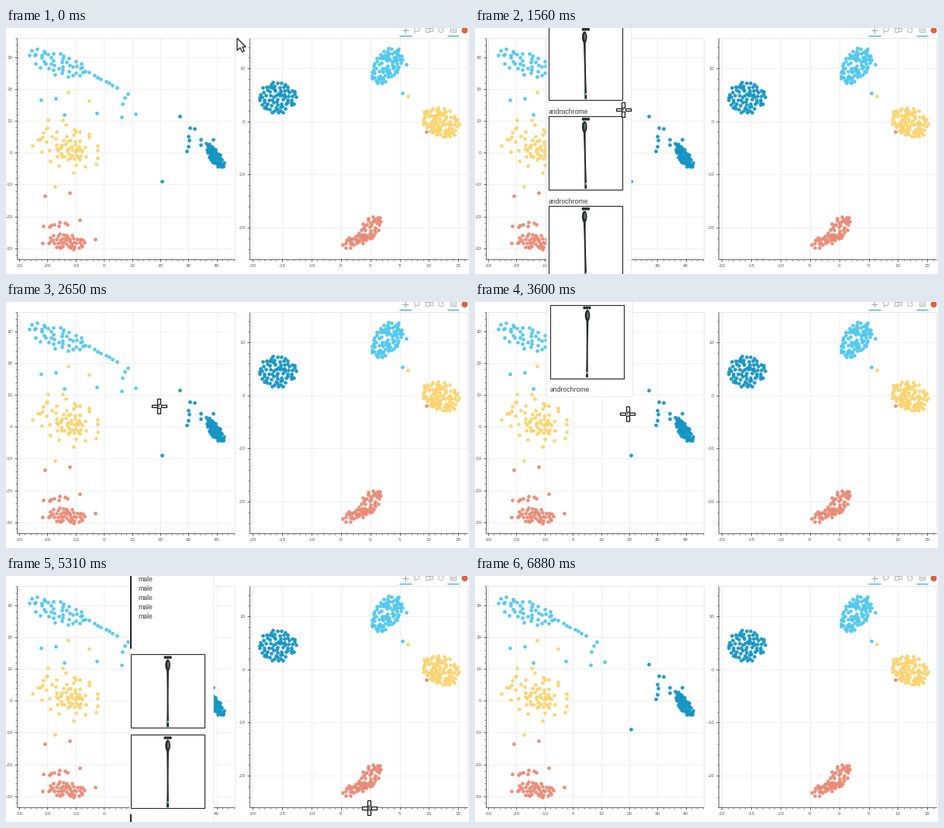
These frames come from a looping animation (597 by 318 pixels, 8000 ms). A matplotlib script:

```python
import numpy as np
import matplotlib.pyplot as plt
from matplotlib.animation import FuncAnimation
from matplotlib.collections import LineCollection
from matplotlib.patches import Arc, Circle, Ellipse, Polygon, Rectangle

W, H, DPI = 597, 318, 100
INTERVAL, LOOP = 40, 8000
PX = 72 / DPI
SKY, BLUE, YELLOW, RED = "#50c8ee", "#1495c3", "#fbd36c", "#e98a75"
INK, GREY, GRID = "#2b2b2b", "#5c5c5c", "#f0f0f0"

rng = np.random.default_rng(7)
fig = plt.figure(figsize=(W / DPI, H / DPI), dpi=DPI, facecolor="white")
ax = fig.add_axes([0, 0, 1, 1])
ax.set_xlim(0, W)
ax.set_ylim(H, 0)
ax.axis("off")


def lines(segments, color, width=1.0, z=1):
    ax.add_collection(LineCollection(segments, colors=color, linewidths=width * PX, zorder=z))


def label(x, y, text, size, color=GREY, ha="center", z=3):
    return ax.text(x, y, text, fontsize=size * PX, color=color, ha=ha,
                   va="center_baseline", family="Liberation Sans", zorder=z)


def ticks(start, step, low, high):
    pos = start + step * np.arange(-60, 61)
    return pos[(pos >= low) & (pos <= high)]


def plot_frame(left, right, x_first, x_step, x_labels, y_first, y_step, y_labels):
    top, bottom = 13, 299
    xs = x_first + x_step * np.arange(len(x_labels))
    ys = y_first + y_step * np.arange(len(y_labels))
    lines([[(x, top), (x, bottom)] for x in xs], GRID)
    lines([[(left, y), (right, y)] for y in ys], GRID)
    lines([[(left, top), (right, top), (right, bottom)]], "#e8e8e8")
    lines([[(left, top), (left, bottom), (right, bottom)]], "#5a5a5a", 0.9, 2)
    small = [[(x, bottom), (x, bottom + 2)] for x in ticks(x_first, x_step / 5, left, right)]
    small += [[(left - 2, y), (left, y)] for y in ticks(y_first, y_step / 5, top, bottom)]
    large = [[(x, bottom - 1), (x, bottom + 3)] for x in xs]
    large += [[(left - 3, y), (left + 1, y)] for y in ys]
    lines(small, GREY, 0.7, 2)
    lines(large, GREY, 0.9, 2)
    for x, value in zip(xs, x_labels):
        label(x, 307, str(value), 6.3)
    for y, value in zip(ys, y_labels):
        label(left - 5, y, str(value), 6.3, ha="right")


def blob(n, cx, cy, rx, ry, tilt=0, power=0.5):
    """Evenly spread random points in a tilted ellipse; a higher power crowds the middle."""
    disc = np.zeros((0, 2))
    for _ in range(n):
        r, a = rng.random(5) ** power, rng.uniform(0, 2 * np.pi, 5)
        tries = np.column_stack([rx * r * np.cos(a), ry * r * np.sin(a)])
        gaps = [np.hypot(*(disc - t).T).min(initial=99) for t in tries]
        disc = np.vstack([disc, tries[np.argmax(gaps)]])
    c, s = np.cos(np.radians(tilt)), np.sin(np.radians(tilt))
    return disc @ np.array([[c, s], [-s, c]]) + (cx, cy)


def trail(n, start, end, jitter):
    """Points strung along a line."""
    return np.linspace(start, end, n) + rng.uniform(-jitter, jitter, (n, 2))


def dots(color, *groups):
    x, y = np.vstack(groups).T
    ax.scatter(x, y, s=(4.7 * PX) ** 2, color=color, lw=0, alpha=0.95, zorder=4)


def left_scatter():
    dots(SKY, blob(39, 66, 46, 41, 15, 14), blob(5, 42, 31, 10, 5),
         trail(10, (98, 52), (142, 77), 2), trail(3, (157, 84), (149, 98), 2),
         [(167, 111), (149, 115), (117, 110), (45, 93), (64, 91), (75, 112)])
    dots(YELLOW, blob(35, 80, 156, 42, 31, 25, 0.6), blob(28, 81, 157, 17, 13, 20),
         trail(6, (37, 153), (57, 121), 3),
         [(80, 83), (107, 94), (73, 119), (90, 134), (107, 137), (63, 205)])
    dots(RED, blob(44, 77, 276, 25, 10, 8), trail(8, (50, 258), (78, 252), 2.5),
         [(50, 217), (82, 213), (95, 248), (47, 278), (115, 273)])
    dots(BLUE, blob(52, 270, 167, 16, 7, 52), trail(6, (253, 149), (267, 153), 2.5),
         trail(4, (236, 139), (234, 159), 1),
         [(224, 114), (237, 129), (243, 130), (251, 144), (267, 144), (201, 198)])


def right_scatter():
    dots(BLUE, blob(76, 350, 89, 24, 21))
    dots(SKY, blob(84, 491, 48, 27, 16, -55), [(516, 47), (511, 84)])
    dots(YELLOW, blob(84, 560, 121, 26, 18, 28), [(518, 88)])
    dots(RED, blob(40, 469, 259, 19, 11, -50), blob(28, 450, 275, 18, 7, -22), [(542, 134)])


def toolbar():
    tone = "#b0b0b0"
    lines([[(511, 2.5), (519, 2.5)], [(515, -1), (515, 6.5)]], "#a8a0a0", 1.0, 3)
    lines([[(x, 10), (x + 15.5, 10)] for x in (507, 568.5)], "#45abc6", 1.3, 3)
    lines([[(527, 4), (528, 7)], [(562, -1), (564, 1), (561, 2)]], tone, 0.9, 3)
    lines([[(574, y), (579, y)] for y in (1, 3)], tone, 0.9, 3)
    style = dict(fill=False, ec=tone, lw=0.9 * PX, zorder=3)
    ax.add_patch(Ellipse((530, 2), 7, 5, **style))
    ax.add_patch(Rectangle((541, 0), 5, 5, **style))
    ax.add_patch(Rectangle((546, 0), 4, 4, **style))
    ax.add_patch(Arc((561, 2.5), 6.5, 6.5, theta1=0, theta2=290, **style))
    ax.add_patch(Rectangle((573, -1), 7, 6, **style))
    ax.add_patch(Circle((591.5, 3), 4, fc="#e0603f", lw=0, zorder=3))


plot_frame(13.5, 294.5, 17, 36.4, range(-30, 41, 10), 38, 41.1, range(30, -31, -10))
plot_frame(313.5, 594.5, 318, 37.9, range(-20, 16, 5), 52, 68.7, range(10, -21, -10))
lines([[(0, 317.5), (W, 317.5)]], "#bdbdbd")
left_scatter()
right_scatter()
toolbar()

overlay = []


def add(patch, z):
    patch.set_zorder(z)
    overlay.append(ax.add_patch(patch))


def caption(x, y, text):
    overlay.append(label(x, y, text, 8.7, "#3a3a3a", "left", 8))


def panel(x, y, w, h):
    add(Rectangle((x, y), w, h, fc="white", ec="#e8e8e8", lw=0.8 * PX, alpha=0.97), 6)


def insect(cx, top, lean):
    body = "#262c2e"
    for dx in (-3.2, 0, 3.2):
        add(Ellipse((cx + dx, top + 4), 4, 4, fc=body, lw=0), 8)
    add(Ellipse((cx - lean, top + 14), 6.6, 15, fc=body, lw=0), 8)
    add(Ellipse((cx - lean + 0.5, top + 13.5), 2.2, 9, fc="#6b7574", lw=0), 9)
    u = np.linspace(0, 1, 12)
    x, y = cx - lean * (1 - u), top + 19 + 75 * u
    half = 1.0 + 0.5 * (2 * u - 1) ** 2
    outline = np.column_stack([np.r_[x - half, (x + half)[::-1]], np.r_[y, y[::-1]]])
    add(Polygon(outline, fc=body, lw=0), 8)
    add(Rectangle((cx - 1, top + 86), 2.4, 3.2, fc="#6fa9ba", lw=0), 9)


def picture(x, y, lean=0, text=None):
    add(Rectangle((x, y), 95, 95, fc="white", ec=INK, lw=1.15 * PX), 7)
    insect(x + 47.8, y, lean)
    if text:
        caption(x, y + 109.3, text)


def three_pictures():
    panel(92, -3, 109, 325)
    for k in range(3):
        picture(95, -2.2 + 116 * k, 1.6, "androchrome")


def one_picture():
    panel(92, -3, 111, 125)
    picture(96.6, 3.5, -0.6, "androchrome")


def male_list():
    panel(159, -3, 108, 325)
    for y, height in ((-3, 97), (308, 14)):
        add(Rectangle((160.3, y), 1.6, height, fc=INK, lw=0), 7)
    for k in range(5):
        caption(170, 3.5 + 12.1 * k, "male")
    for k in range(2):
        picture(160.8, 101.2 + 104 * k)


def two_pictures():
    panel(158.5, 43.5, 108.5, 237)
    for k in range(2):
        picture(161, 46.2 + 116 * k, 0, "male")


def arrow(x, y):
    shape = [(0, 0), (0, 16), (4, 12.5), (6.5, 18), (9.3, 16.8), (6.8, 11.5), (11.3, 11.5)]
    add(Polygon(np.array(shape) + (x, y), fc="#f4f4f4", ec="#333333", lw=1.4 * PX), 12)


def crosshair(x, y):
    style = dict(fc="white", ec="#1a1a1a", lw=1.3 * PX)
    for side in (-9.5, 2.5):
        add(Rectangle((x + side, y - 1.8), 7, 3.6, **style), 12)
        add(Rectangle((x - 1.8, y + side), 3.6, 7, **style), 12)
    add(Circle((x, y), 0.8, fc="#1a1a1a", lw=0), 12)


# The screen refreshes in bursts of seven steps, then rests.
BURSTS = (150, 1280, 2370, 3450, 4680, 5750)
EXIT = 6880
CHANGES = np.concatenate([[0], *(np.linspace(b, b + 935, 7) for b in BURSTS), [EXIT]])
TOOLTIPS = [(1430, 2030, three_pictures), (2960, 3700, one_picture),
            (4900, 6000, male_list), (6000, EXIT, two_pictures)]
# Pointer stops: time, x, y
STOPS = np.array([(0, 298, 13), (1430, 190, 105), (1590, 191, 105.5), (2650, 198, 138.5),
                  (3600, 195, 143.5), (4370, 422, 294), (5300, 468, 300), (6230, 472, 294.5)])


def clear():
    while overlay:
        overlay.pop().remove()
    return []


def update(frame):
    clear()
    now = CHANGES[np.searchsorted(CHANGES, (frame + 1) * INTERVAL, side="right") - 1]
    for start, end, draw in TOOLTIPS:
        if start <= now < end:
            draw()
    if now < EXIT:
        pointer = crosshair if now > 0 else arrow
        pointer(*(np.interp(now, STOPS[:, 0], STOPS[:, k]) for k in (1, 2)))
    return overlay


anim = FuncAnimation(fig, update, frames=LOOP // INTERVAL, init_func=clear,
                     interval=INTERVAL, repeat=True, repeat_delay=0, blit=False)
plt.show()
```
